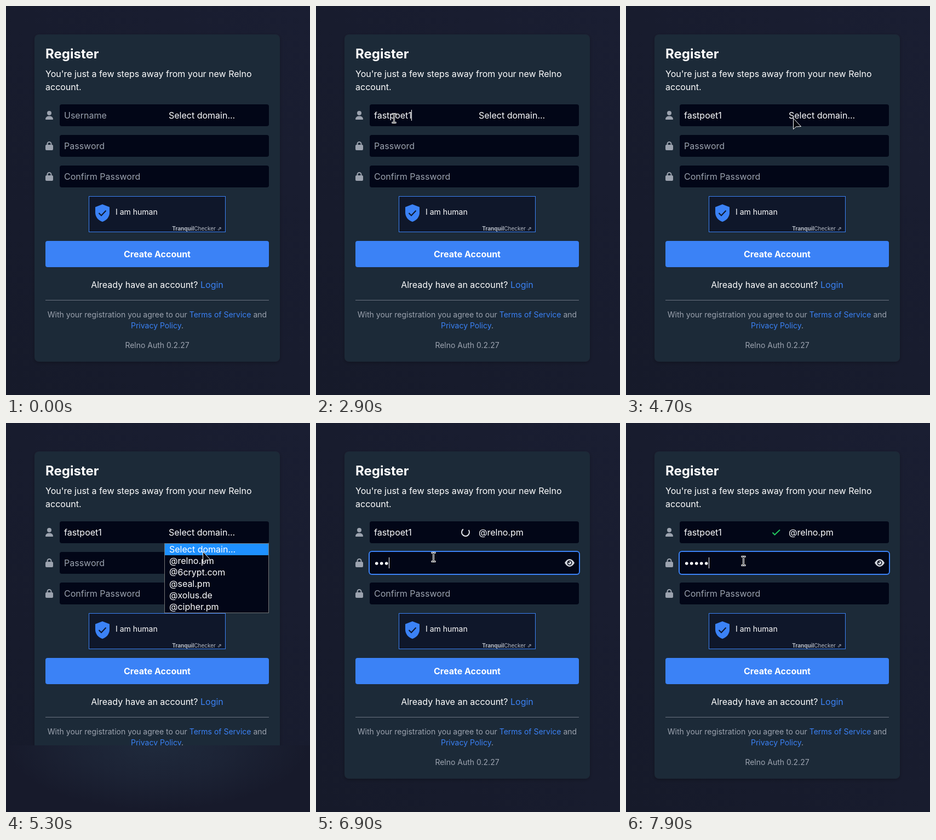
Recreate the animation shown at these times as an HTML page. Size 555x712 px, loop 8 s.

```html
<!DOCTYPE html>
<html lang="en">
<head>
<meta charset="utf-8">
<title>Register</title>
<style>
  html, body { margin: 0; width: 100%; height: 100%; overflow: hidden; background: #171b2d; }
  svg { display: block; width: 555px; height: 712px; font: 16px Inter, sans-serif; fill: #fff; }
  text { white-space: pre; }
  .mid { text-anchor: middle; }
  .bold { font-weight: 700; }
  .small { font-size: 14px; }
  .gray { fill: #9ca3af; }
  .blue { fill: #3b82f6; }
  .field { fill: #020617; }
</style>
</head>
<body>
<svg viewBox="0 0 555 712" xmlns="http://www.w3.org/2000/svg">
  <defs>
    <linearGradient id="page" x1="0" y1="1" x2="1" y2="0">
      <stop offset="0" stop-color="#161a2a"/>
      <stop offset="1" stop-color="#1a1e32"/>
    </linearGradient>
    <radialGradient id="glow" gradientUnits="userSpaceOnUse" cx="0" cy="0" r="1"
      gradientTransform="translate(276 590) scale(276 118)">
      <stop offset="0" stop-color="#1f2a3c"/>
      <stop offset=".5" stop-color="#1c2335"/>
      <stop offset="1" stop-color="#171a2b"/>
    </radialGradient>
    <filter id="shadow" x="-5%" y="-5%" width="110%" height="110%">
      <feDropShadow dx="0" dy="2" stdDeviation="3" flood-color="#000" flood-opacity=".25"/>
    </filter>
    <g id="lock">
      <path d="M3.5 7V4.5a3.5 3.5 0 0 1 7 0V7" fill="none" stroke="#9ca3af" stroke-width="2"/>
      <rect y="6" width="14" height="10" rx="2"/>
    </g>
  </defs>

  <rect width="555" height="712" fill="url(#page)"/>
  <rect x="52" y="52" width="448" height="599" rx="8" fill="#1f2937" filter="url(#shadow)"/>

  <text class="bold" x="72" y="96" font-size="24">Register</text>
  <text x="72" y="130">You're just a few steps away from your new Relno</text>
  <text x="72" y="154">account.</text>

  <g class="gray">
    <g transform="translate(72 192)">
      <circle cx="7" cy="4" r="4"/>
      <path d="M5.6 9.5h2.8a5.6 5.6 0 0 1 5.6 5.6q0 .9-.9.9H.9q-.9 0-.9-.9a5.6 5.6 0 0 1 5.6-5.6z"/>
    </g>
    <use href="#lock" x="72" y="248"/>
    <use href="#lock" x="72" y="304"/>
  </g>

  <rect id="ring" class="blue" x="96" y="234" width="386" height="44" rx="6"/>
  <g class="field">
    <rect x="98" y="180" width="382" height="40" rx="4"/>
    <rect x="98" y="236" width="382" height="40" rx="4"/>
    <rect x="98" y="292" width="382" height="40" rx="4"/>
  </g>
  <text id="user" x="106" y="206"></text>
  <text id="domain" x="297" y="206"></text>
  <text id="passHint" class="gray" x="106" y="262">Password</text>
  <text class="gray" x="106" y="318">Confirm Password</text>
  <g id="dots"></g>
  <rect id="caret" width="1" height="20"/>

  <g id="eye" transform="translate(463 256)">
    <path d="M-9 0Q-5 -7 0 -7T9 0Q5 7 0 7T-9 0z" fill="#d5d8df"/>
    <circle r="4.5" class="field"/>
    <circle r="3" fill="#d5d8df"/>
    <circle cx="-1.3" cy="-1.3" r="1.5" class="field"/>
  </g>
  <circle id="spin" cx="273" cy="200" r="7" fill="none" stroke="#e5e7eb" stroke-width="2"
    pathLength="360" stroke-dasharray="270 90"/>
  <path id="tick" d="M267.5 200.5l4 4 9.5-9" fill="none" stroke="#22c55e" stroke-width="2"/>

  <rect x="151.5" y="348.5" width="249" height="65" fill="#0f172a" stroke="#3b82f6"/>
  <path class="blue" d="M176 363l13 5v10c0 8-5 14-13 17c-8-3-13-9-13-17v-10z"/>
  <path d="M169.500 379l4.500 4.500 8.500-9" fill="none" stroke="#0f172a" stroke-width="2"/>
  <text class="small" x="200" y="382">I am human</text>
  <text x="394" y="411" font-size="10" text-anchor="end" fill="#b4bac4"><tspan class="bold">Tranquil</tspan>Checker <tspan font-family="DejaVu Sans, sans-serif">⇗</tspan></text>

  <rect class="blue" x="72" y="430" width="408" height="48" rx="4"/>
  <text class="mid bold" x="276" y="460">Create Account</text>
  <text class="mid" x="276" y="516">Already have an account? <tspan class="blue">Login</tspan></text>
  <rect x="72" y="538" width="408" height="1" fill="#6b7280"/>
  <g class="mid small gray">
    <text x="276" y="570">With your registration you agree to our <tspan class="blue">Terms of Service</tspan> and</text>
    <text x="276" y="590"><tspan class="blue">Privacy Policy</tspan>.</text>
    <text x="276" y="626">Relno Auth 0.2.27</text>
  </g>

  <rect id="cover" y="590" width="555" height="122" fill="url(#glow)"/>
  <g id="menu">
    <rect x="289.5" y="220.500" width="190" height="127" class="field" stroke="#767676"/>
    <rect id="pick" x="290" width="189" height="21" fill="#1e90ff"/>
  </g>

  <g id="beam" fill="none" stroke-linecap="square">
    <path id="stem" d="M-2.500 -8.500h1.500l1 1 1-1h1.500M0 -7.500v14M-2.500 7.500h1.500l1-1 1 1h1.500" stroke="#fff" stroke-width="3"/>
    <use href="#stem" id="core"/>
    <path d="M-2.500 -8.500h1.500l1 1 1-1h1.500M0 -7.500v14M-2.500 7.500h1.500l1-1 1 1h1.500" stroke="#000"/>
  </g>
  <path id="arrow" d="M.5 .5v20l5-4.500 9-.5z" fill="#05070f" stroke="#fff"/>
</svg>

<script>
const LOOP = 8000, STEP = 100;
const NAME = 'fastpoet1';
const OPTIONS = ['Select domain...', '@relno.pm', '@6crypt.com', '@seal.pm', '@xolus.de', '@cipher.pm'];
const NAME_KEYS = [1600, 1700, 1900, 2100, 2400, 2500, 2600, 2900, 2900];
const PASS_KEYS = [6500, 6700, 6900, 7200, 7900];
// time, x, y of the pointer
const PATH = [
  [300, 122, 140], [400, 142, 180], [500, 142, 180], [600, 153, 195], [700, 143, 206],
  [4400, 143, 206], [4800, 359, 204], [5000, 359, 204], [5300, 359, 235], [5400, 359, 235],
  [5700, 352, 250], [5900, 350, 252], [6100, 215, 246], [6900, 215, 246], [7200, 215, 253]
];

const $ = id => document.getElementById(id);
const show = (id, on) => { $(id).style.display = on ? '' : 'none'; };
const within = (t, a, b) => t >= a && t < b;
const typed = (keys, t) => keys.filter(k => k <= t).length;
const ramp = (t, a, b) => Math.min(1, Math.max(0, (t - a) / (b - a)));

function add(parent, tag, attrs, text = '') {
  const el = document.createElementNS('http://www.w3.org/2000/svg', tag);
  for (const key in attrs) el.setAttribute(key, attrs[key]);
  el.textContent = text;
  $(parent).append(el);
}

OPTIONS.forEach((name, i) => add('menu', 'text', { x: 298, y: 237 + 21 * i }, name));
PASS_KEYS.forEach((_, i) => add('dots', 'circle', { cx: 110.7 + 9 * i, cy: 257, r: 2.8 }));
$('core').remove();

function pointer(t) {
  const next = PATH.findIndex(p => p[0] > t);
  if (next < 0) return PATH[PATH.length - 1].slice(1);
  const a = PATH[Math.max(0, next - 1)], b = PATH[next];
  const k = ramp(t, a[0], b[0]);
  return [1, 2].map(i => Math.round(a[i] + (b[i] - a[i]) * k));
}

function drawFields(t) {
  const letters = typed(NAME_KEYS, t), dots = typed(PASS_KEYS, t);
  const user = $('user');
  user.textContent = letters ? NAME.slice(0, letters) : 'Username';
  user.setAttribute('class', letters ? '' : 'gray');
  $('domain').textContent = OPTIONS[t < 5900 ? 0 : 1];

  show('ring', t >= 6300);
  show('passHint', !dots);
  show('eye', dots);
  [...$('dots').children].forEach((dot, i) => { dot.style.display = i < dots ? '' : 'none'; });

  const inName = within(t, 1500, 3500) || within(t, 4000, 4500);
  const inPass = within(t, 6300, 7600) || t >= 7900;
  const width = inPass ? 9 * dots : letters ? user.getComputedTextLength() : 0;
  show('caret', inName || inPass);
  $('caret').setAttribute('x', Math.floor(106 + width));
  $('caret').setAttribute('y', inPass ? 246 : 190);

  show('spin', within(t, 6000, 7400));
  $('spin').setAttribute('transform', `rotate(${35 + (t - 6100) * 0.36} 273 200)`);
  show('tick', t >= 7400);
}

function drawMenu(t) {
  const alpha = t < 5900 ? ramp(t, 4700, 4900) : 1 - ramp(t, 5900, 6135);
  show('menu', alpha > 0);
  $('menu').setAttribute('opacity', alpha);
  $('pick').setAttribute('y', t < 5600 ? 221 : 242);
  show('cover', within(t, 5100, 6000));
}

function drawPointer(t) {
  const [x, y] = pointer(t), overMenu = within(t, 4700, 6000);
  show('beam', t >= 300 && !overMenu);
  show('arrow', overMenu);
  $('beam').setAttribute('transform', `translate(${x - 0.5} ${y})`);
  $('arrow').setAttribute('transform', `translate(${x} ${y})`);
}

const start = performance.now();
function frame() {
  const ms = (performance.now() - start) % LOOP;
  const t = Math.floor(ms / STEP) * STEP;
  drawFields(t);
  drawMenu(t);
  drawPointer(t);
  requestAnimationFrame(frame);
}
frame();
</script>
</body>
</html>
```
